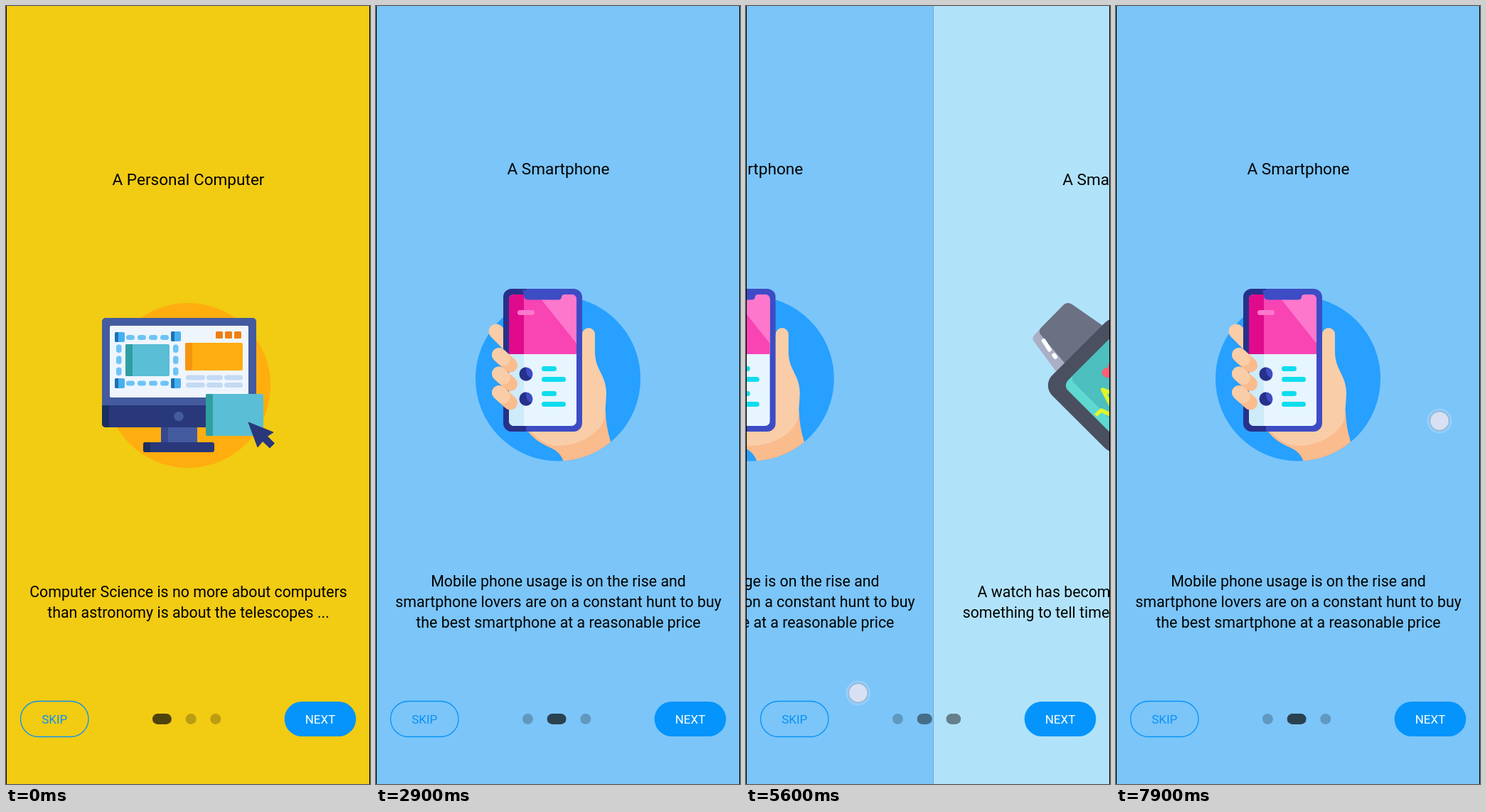
Animation of 512x1095 px, one loop 8 s. Source, as an HTML page:

```html
<!DOCTYPE html>
<html lang="en">
<head>
<meta charset="utf-8">
<title>Onboarding</title>
<style>
  html, body { margin: 0; width: 100%; height: 100%; overflow: hidden; background: #000; }
  svg { display: block; width: 512px; height: 1095px; }
  text { font-family: Roboto, sans-serif; text-anchor: middle; }
  .title { font-size: 22.6px; }
  .body { font-size: 21.35px; }
  .btn { font-size: 17px; }
</style>
</head>
<body>
<svg viewBox="0 0 512 1095">
  <defs>
    <clipPath id="monitor"><rect x="135" y="439" width="217" height="154" rx="5"/></clipPath>
    <clipPath id="base"><rect x="193" y="614" width="100" height="14" rx="3"/></clipPath>
    <clipPath id="phone"><rect x="179" y="398" width="111" height="201" rx="12"/></clipPath>
    <clipPath id="screen"><rect x="187" y="406" width="95" height="185" rx="7"/></clipPath>
    <clipPath id="disc"><circle cx="256" cy="524.5" r="116"/></clipPath>
    <clipPath id="face"><rect x="-51.7" y="-51.7" width="103.4" height="103.4" rx="10"/></clipPath>
    <g id="handle">
      <rect width="14" height="14" rx="2" fill="#47b0ee"/>
      <path d="M2 0H5V14H2Q0 14 0 12V2Q0 0 2 0" fill="#1b72b5"/>
    </g>
    <g id="avatar">
      <circle r="9.5" fill="#3d4cc4"/>
      <path d="M0 -9.5A9.5 9.5 0 1 0 8 5.5Q-1 3 0 -9.5" fill="#27318a"/>
    </g>
    <g id="finger" fill="none" stroke-width="20" stroke-linecap="round">
      <path d="M0 0L16 14.5" stroke="#fabb8d"/>
      <path d="M0 0L6 5.5" stroke="#f9cda8"/>
    </g>
  </defs>

  <g id="strip">
    <g>
      <rect x="1" width="511" height="1095" fill="#f2cb13"/>
      <circle cx="256" cy="534" r="116" fill="#ffad0f"/>
      <path d="M218 593H269V614H218Z" fill="#445ba0"/>
      <path d="M218 593H228V614H218Z" fill="#35498f"/>
      <g clip-path="url(#base)">
        <path d="M193 614H293V628H193Z" fill="#28387b"/>
        <path d="M193 614H203V628H193Z" fill="#1a2e5f"/>
      </g>
      <g clip-path="url(#monitor)">
        <path d="M135 439H352V562H135Z" fill="#445ba0"/>
        <path d="M135 562H352V593H135Z" fill="#28387b"/>
        <path d="M135 562H145V593H135Z" fill="#1a2e5f"/>
      </g>
      <rect x="146" y="450" width="195" height="101" rx="2" fill="#eff5fd"/>
      <circle cx="243" cy="577.5" r="6.8" fill="#445ba0"/>
      <g id="dashes" fill="#6cc4f5"></g>
      <use href="#handle" x="153" y="459"/><use href="#handle" x="232" y="458"/>
      <use href="#handle" x="153" y="524"/><use href="#handle" x="232" y="524"/>
      <rect x="168" y="476" width="62" height="45" rx="2" fill="#5abed6"/>
      <path d="M170 476H178V521H170Q168 521 168 519V478Q168 476 170 476" fill="#2fa0a0"/>
      <rect x="252" y="474" width="81" height="39" rx="2" fill="#ffad0f"/>
      <path d="M254 474H262V513H254Q252 513 252 511V476Q252 474 254 474" fill="#f5960f"/>
      <g id="tiles" fill="#ee7f10"></g>
      <g id="pills" fill="#c3daf3"></g>
      <rect x="281" y="546" width="81" height="59" rx="2" fill="#5abed6"/>
      <path d="M283 546H291V605H283Q281 605 281 603V548Q281 546 283 546" fill="#2fa0a0"/>
      <path d="M341 586L376 600L367.500 605.500L377.500 615.500L371 622L361 612.500L354 621Z" fill="#28387b" stroke="#28387b" stroke-linejoin="round"/>
      <text class="title" x="256.500" y="252">A Personal Computer</text>
      <text class="body" x="256.500" y="832">Computer Science is no more about computers</text>
      <text class="body" x="256.500" y="861">than astronomy is about the telescopes ...</text>
    </g>

    <g transform="translate(511)">
      <rect x="1" width="511" height="1095" fill="#7bc5f9"/>
      <circle cx="256" cy="524.5" r="116" fill="#27a0ff"/>
      <g clip-path="url(#disc)">
        <path d="M212 596C222 612 238 618 248 623Q260 629 264 642H335L330 613Q323 590 323 570Z" fill="#fabb8d"/>
      </g>
      <path d="M290 462a9 9 0 0 1 18 0V488C309 514 324 519 324 546L322 578C316 605 280 620 253 619C238 618 222 606 214 594Z" fill="#f9cda8"/>
      <path d="M169 458L186 475" stroke="#f9cda8" stroke-width="21" stroke-linecap="round"/>
      <g clip-path="url(#phone)">
        <path d="M179 398H290V599H179Z" fill="#3d4cc4"/>
        <path d="M179 398H211V599H179Z" fill="#27318a"/>
      </g>
      <g clip-path="url(#screen)">
        <path d="M187 406H282V591H187Z" fill="#e6f5fe"/>
        <path d="M187 490H208V591H187Z" fill="#cdebf8"/>
        <path d="M187 406H282V490H187Z" fill="#f944b4"/>
        <path d="M187 406H208V490H187Z" fill="#df0a8c"/>
        <path d="M227 406H282V475Z" fill="#fd78cc"/>
      </g>
      <path d="M206 400H264V406Q261 407 261 409Q261 413.500 256 413.500H214Q208 413.500 208 407Z" fill="#3d4cc4"/>
      <rect x="199" y="428" width="24" height="7" rx="3.5" fill="#fd78cc"/>
      <use href="#avatar" x="211" y="518"/><use href="#avatar" x="211" y="553"/>
      <g id="lines" fill="#0fddee"></g>
      <use href="#finger" x="173" y="491"/><use href="#finger" x="173" y="517.5"/><use href="#finger" x="173" y="544"/>
      <text class="title" x="256.500" y="237">A Smartphone</text>
      <text class="body" x="256.500" y="817">Mobile phone usage is on the rise and</text>
      <text class="body" x="256.500" y="846">smartphone lovers are on a constant hunt to buy</text>
      <text class="body" x="256.500" y="875">the best smartphone at a reasonable price</text>
    </g>

    <g transform="translate(1022)">
      <rect x="1" width="511" height="1095" fill="#b0e3fa"/>
      <path d="M152 453L142 464Q139 468 142 472L176 518L195 503Z
               M283 602L274 611L318 648Q323 651 328 648L338 637Z" fill="#abafc6"/>
      <path d="M184 420.500Q190 416 196 420L242 452L190 508L152 463Q148 458 152 453Z
               M338 550L370 596Q374 601 370 605L337 638Q333 641 328 638L280 605Z" fill="#6b7083"/>
      <g fill="none" stroke-linecap="round">
        <path d="M156 471L164 483.500M170.500 491.500L172.500 494" stroke="#fff" stroke-width="6"/>
        <path d="M294 460L305 471M311 477L317 483" stroke="#c6d4ee" stroke-width="5"/>
      </g>
      <g transform="translate(256 534) rotate(45)">
        <rect x="-72.300" y="-72.300" width="144.600" height="144.600" rx="20" fill="#4a5060"/>
        <g clip-path="url(#face)">
          <path d="M-52 -52H52V52H-52Z" fill="#5ed8d0"/>
          <path d="M-52 -60H60V38H-42Q-52 38 -52 28Z" fill="#4dbfbf"/>
        </g>
      </g>
      <path d="M262 524L245 523C235 521 236 509 246 509.500C246 498 261 496 262 506Q263 512 262 524Z" fill="#ff5f72"/>
      <path d="M229 576L237 569L260 580L239 540L272 553L267 540L286 519" fill="none" stroke="#dff82a" stroke-width="5.500" stroke-linejoin="round"/>
      <circle cx="286" cy="519" r="2.700" fill="#dff82a"/>
      <text class="title" x="256.500" y="252">A Smart watch</text>
      <text class="body" x="256.500" y="832">A watch has become so much more than</text>
      <text class="body" x="256.500" y="861">something to tell time. With smart watches ...</text>
    </g>
  </g>

  <rect x="20.500" y="978.500" width="95.500" height="50" rx="25" fill="none" stroke="#0a92f5" stroke-width="1.300"/>
  <text class="btn" x="68.300" y="1010" fill="#0a92f5">SKIP</text>
  <g id="dots"></g>
  <rect id="nextBox" y="979" height="49" rx="24.500" fill="#0494fb"/>
  <text id="nextText" class="btn" y="1010" fill="#fff"></text>
  <g id="touch">
    <circle r="17.500" fill="#fff" opacity=".18"/>
    <circle r="13.500" fill="#f5e8f0" fill-opacity=".7" stroke="#788caa" stroke-opacity=".42" stroke-width="1.800"/>
  </g>
  <path d="M0 0H1V1095H0ZM511 0H512V1095H511Z"/>
</svg>
<script>
const $ = id => document.getElementById(id);
const LOOP = 8000, PAGE = 511;

function add(parent, x, y, width, height, rx) {
  const r = document.createElementNS('http://www.w3.org/2000/svg', 'rect');
  const attrs = { x, y, width, height, rx };
  for (const k in attrs) r.setAttribute(k, attrs[k]);
  return $(parent).appendChild(r);
}

for (let i = 0; i < 4; i++) {
  for (const y of [463, 527.5]) add('dashes', 169 + 16 * i, y, 12, 7, 3.5);
}
for (let i = 0; i < 3; i++) {
  for (const x of [155, 235]) add('dashes', x, 476.5 + 16 * i, 7.5, 11.5, 3.5);
  add('tiles', 295 + 13 * i, 458, 10, 10, 1.5);
  for (const y of [519.5, 530]) add('pills', [253, 282, 307][i], y, [27, 23, 26][i], 7, 3.5);
}
for (const y of [507, 542]) {
  add('lines', 233, y, 21, 7, 3.5);
  add('lines', 233, y + 15, 34, 7, 3.5);
}
const dots = [0, 1, 2].map(() => add('dots', 0, 996, 15, 15, 7.3));

// [time, scroll in px, eased on arrival]
const scroll = [
  [0, 0], [1000, 0], [1900, 178], [2200, 240], [2650, 511, 1],
  [4400, 511], [4500, 533], [5600, 759], [5720, 787], [6150, 1022, 1],
  [6700, 1022], [7250, 760], [7650, 511, 1], [LOOP, 511]
];

// Fingers follow the scroll from their starting point.
const touches = [
  { from: 930, to: 2200, x: 442, y: 690, start: 0, slope: .05 },
  { from: 4300, to: 5720, x: 406, y: 947.3, start: 511, slope: .079 },
  { from: 6630, to: 7250, x: 130, y: 600, start: 1022, slope: .04 },
  { from: 7800, to: LOOP, x: 455, y: 584, start: 511, slope: 0 }
];

function scrollAt(t) {
  const i = scroll.findIndex(k => k[0] > t);
  const [t0, a] = scroll[i - 1], [t1, b, eased] = scroll[i];
  const u = (t - t0) / (t1 - t0);
  return a + (b - a) * (eased ? 1 - (1 - u) ** 3 : u);
}

function draw(t) {
  const pos = scrollAt(t), page = pos / PAGE, done = page >= 1.5;
  $('strip').setAttribute('transform', `translate(${-pos})`);

  let x = done ? 205.2 : 206;
  dots.forEach((dot, i) => {
    const on = Math.max(0, 1 - Math.abs(page - i)), w = 14.8 + 12 * on;
    const shade = 20 - 12 * on;
    dot.setAttribute('x', x);
    dot.setAttribute('width', w);
    dot.setAttribute('fill', `rgba(${shade},${shade},${shade},${.25 + .45 * on})`);
    x += w + 19.9;
  });

  $('nextBox').setAttribute('x', done ? 389.7 : 391.7);
  $('nextBox').setAttribute('width', done ? 102.6 : 100.6);
  $('nextText').setAttribute('x', done ? 441 : 442);
  $('nextText').textContent = done ? 'DONE' : 'NEXT';

  const f = touches.find(f => t >= f.from && t < f.to);
  $('touch').style.display = f ? '' : 'none';
  if (f) {
    const moved = pos - f.start;
    $('touch').setAttribute('transform', `translate(${f.x - moved} ${f.y + moved * f.slope})`);
  }
}

const begin = performance.now();
function tick() {
  draw((performance.now() - begin) % LOOP);
  requestAnimationFrame(tick);
}
tick();
</script>
</body>
</html>
```
